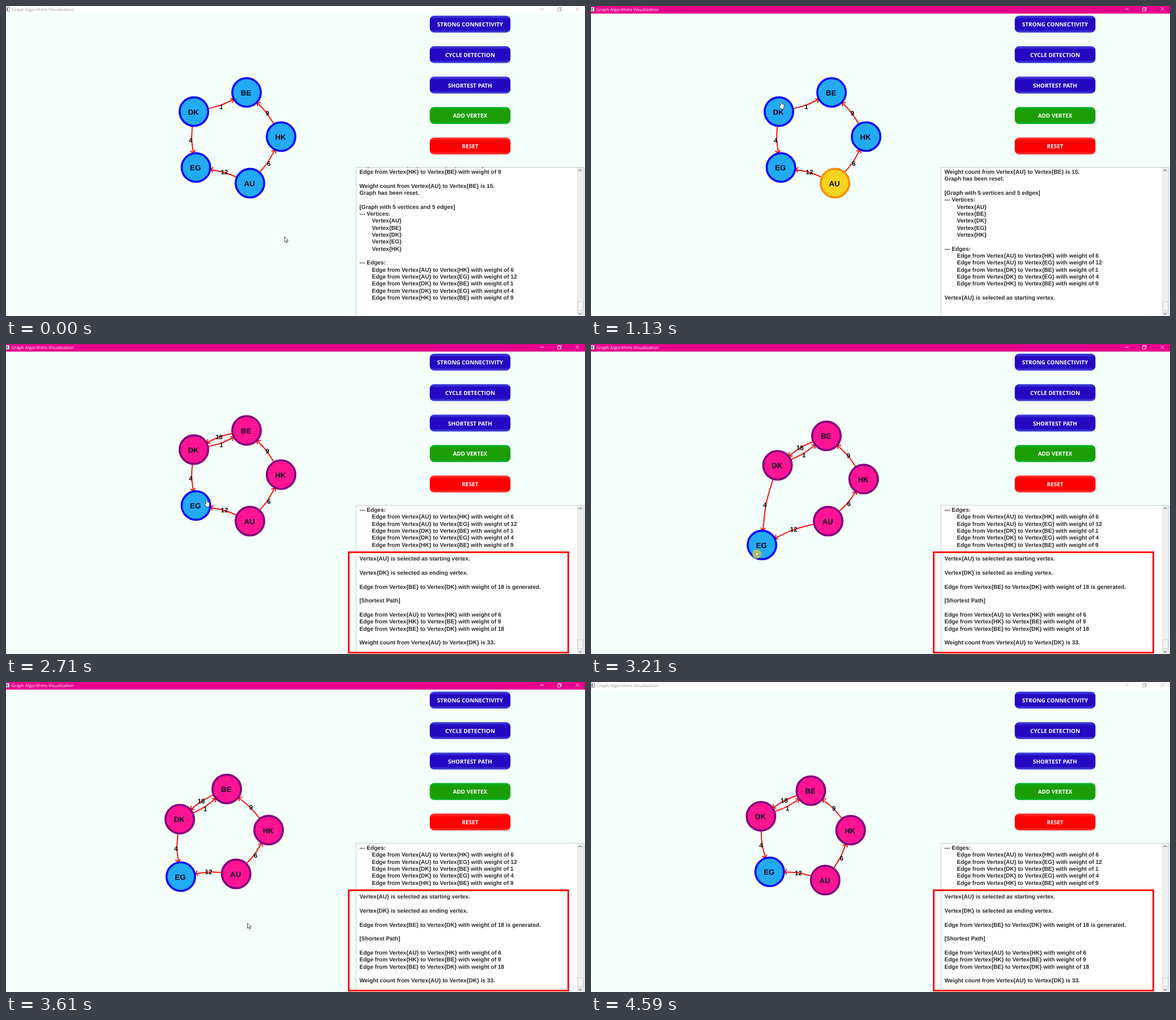
Write an HTML page that moves like this. It is 1023 px wide and 547 px high and loops after 4610 ms.

```html
<!DOCTYPE html>
<html lang="en">
<head>
<meta charset="utf-8">
<title>Graph Algorithms Visualization</title>
<style>
  html, body { margin: 0; width: 100%; height: 100%; overflow: hidden; background: #f4fffb; }
  svg { display: block; width: 1023px; height: 547px; }
  text { white-space: pre; text-rendering: geometricPrecision; }
  .ui { font-family: "Open Sans", "Noto Sans", sans-serif; }
  .button { font-weight: 700; font-size: 9.95px; fill: #fff; text-anchor: middle; }
  .log { font: 700 10.06px "Liberation Sans", Arial, sans-serif; fill: #282828; }
  .node { font: 700 13.3px "Liberation Sans", Arial, sans-serif; fill: #06061a; text-anchor: middle; }
  .weight { font: 700 11.4px "Liberation Sans", Arial, sans-serif; fill: #000; text-anchor: middle; }
  .edge { fill: none; stroke: #fa140c; stroke-width: 2; }
  .pointer { fill: #fff; stroke: #222; stroke-width: .8; }
</style>
</head>
<body>
<svg id="stage" viewBox="0 0 1023 547">
  <defs>
    <clipPath id="logClip"><rect x="619" y="285.3" width="390" height="262"/></clipPath>
  </defs>
  <rect width="1023" height="547" fill="#f4fffb"/>
</svg>
<script>
const LOOP = 4610;
const PICK_START = 560, PICK_END = 1290, SOLVE = 2360;
const GRAB = 2960, RELEASE = 3310, REBOUND = 3610, POINTER_GONE = 4050, BLUR = 4570;
const stage = document.getElementById('stage');

function add(parent, tag, attrs = {}, text) {
  const el = document.createElementNS('http://www.w3.org/2000/svg', tag);
  set(el, attrs);
  if (text !== undefined) el.textContent = text;
  parent.appendChild(el);
  return el;
}
function set(el, attrs) {
  for (const key in attrs) el.setAttribute(key, attrs[key]);
}
const show = (el, visible) => set(el, { visibility: visible ? 'visible' : 'hidden' });

const ramp = (t, from, to) => Math.min(1, Math.max(0, (t - from) / (to - from)));
const smooth = u => u * u * (3 - 2 * u);
const easeOut = u => 1 - (1 - u) ** 3;
const mix = ([x0, y0], [x1, y1], u) => [x0 + (x1 - x0) * u, y0 + (y1 - y0) * u];

// Title bar
const titleBar = add(stage, 'rect', { width: 1023, height: 13.4 });
add(stage, 'rect', { x: -.5, y: 2, width: 6.5, height: 7.5, fill: '#fff', stroke: '#667', 'stroke-width': .8 });
add(stage, 'rect', { x: 1, y: 3.5, width: 2, height: 4.5, fill: '#556' });
const titleText = add(stage, 'text', { x: 9.8, y: 8.6, class: 'ui', 'font-size': 7.7 }, 'Graph Algorithms Visualization');
const controls = add(stage, 'path', {
  d: 'M943.5 5.5h6.5M974.5 4h5v5h-5zM976 4v-1.5h5v5h-1.5M1006.5 2.5l6 6m0-6l-6 6',
  fill: 'none', 'stroke-width': .8
});

// Buttons
const BUTTONS = [
  ['STRONG CONNECTIVITY', 'blue'], ['CYCLE DETECTION', 'blue'], ['SHORTEST PATH', 'blue'],
  ['ADD VERTEX', 'green'], ['RESET', 'red']
];
const SHADES = { blue: ['#4a4fe0', '#2408c2'], green: ['#06b42c', '#1b9e05'], red: ['#ff4840', '#ff0000'] };
const buttonTop = i => 17 + i * 53.75;
for (const name in SHADES) {
  const gradient = add(stage.querySelector('defs'), 'linearGradient', { id: name, x2: 0, y2: 1 });
  const [edge, core] = SHADES[name];
  [[0, edge], [.2, core], [.82, core], [1, edge]].forEach(([offset, color]) =>
    add(gradient, 'stop', { offset, 'stop-color': color }));
}
BUTTONS.forEach(([label, shade], i) => {
  const y = buttonTop(i);
  add(stage, 'rect', { x: 748.7, y, width: 142.6, height: 30, rx: 8, fill: `url(#${shade})` });
  add(stage, 'text', { x: 820, y: y + 19, class: 'ui button' }, label);
});

// Graph: each vertex has its place at home, on release, after the rebound and settled
const VERTICES = {
  AU: [[431, 312.6], [414.3, 312.6], [406.6, 338.5], [413.8, 349.6]],
  BE: [[425, 152.5], [412.4, 165.8], [390, 188.7], [388.4, 191.7]],
  DK: [[332, 186.3], [328.6, 225], [307, 242], [300.3, 237]],
  EG: [[335.6, 285], [288.8, 382], [308.8, 343.5], [315.7, 335]],
  HK: [[486, 230.5], [480, 241.4], [464, 261.3], [458.7, 261.5]]
};
const edge = (from, to, weight) => ({ from, to, weight });
const EDGES = [edge('AU', 'HK', 6), edge('AU', 'EG', 12), edge('DK', 'BE', 1), edge('DK', 'EG', 4), edge('HK', 'BE', 9)];
const GENERATED = edge('BE', 'DK', 18);
const ALL_EDGES = [...EDGES, GENERATED];
const SHORTEST = [EDGES[0], EDGES[4], GENERATED];

// Log panel
add(stage, 'rect', { x: 618.5, y: 284.8, width: 403, height: 270, fill: '#fff', stroke: '#c4c9c9' });
add(stage, 'rect', { x: 1009.5, y: 285.5, width: 11.5, height: 262, fill: '#eee', stroke: '#dedede', 'stroke-width': .7 });
add(stage, 'rect', { x: 1010.3, y: 522, width: 9.2, height: 15.5, fill: '#f4f4f4', stroke: '#c4c4c4', 'stroke-width': .8 });
add(stage, 'path', { d: 'M1011.5 291.5l3-3 3 3M1011.5 541.5l3 3 3-3', fill: 'none', stroke: '#6f7f95', 'stroke-width': 1.1 });

const describe = ({ from, to, weight }) => `Edge from Vertex{${from}} to Vertex{${to}} with weight of ${weight}`;
const indent = line => '\t' + line;
const LINES = [
  describe(EDGES[0]), describe(EDGES[4]), '',
  'Weight count from Vertex{AU} to Vertex{BE} is 15.', 'Graph has been reset.', '',
  '[Graph with 5 vertices and 5 edges]', '--- Vertices:',
  ...Object.keys(VERTICES).map(name => indent(`Vertex{${name}}`)), '',
  '--- Edges:', ...EDGES.map(describe).map(indent), '',
  'Vertex{AU} is selected as starting vertex.', '',
  'Vertex{DK} is selected as ending vertex.', '',
  describe(GENERATED) + ' is generated.', '',
  '[Shortest Path]', '', ...SHORTEST.map(describe), '',
  'Weight count from Vertex{AU} to Vertex{DK} is 33.'
];
const LINE_HEIGHT = 12.34;
const logText = add(add(stage, 'g', { 'clip-path': 'url(#logClip)' }), 'g');
const logLines = LINES.map((line, i) => add(logText, 'text', {
  class: 'log', x: line[0] === '\t' ? 646.5 : 624.5, y: 296 + (i - 1) * LINE_HEIGHT
}, line.trim()));
const highlight = add(stage, 'rect', { x: 605.5, y: 367.5, width: 388, height: 177, fill: 'none', stroke: '#fb0007', 'stroke-width': 3 });

function drawLog(t) {
  const solved = t >= SOLVE;
  const scroll = solved ? 13 : 2 * ((t >= PICK_START) + (t >= PICK_END));
  set(logText, { transform: `translate(0 ${-scroll * LINE_HEIGHT})` });
  logLines.forEach((line, i) => show(line, solved || i < scroll + 20));
  show(highlight, solved);
}

const STYLES = { idle: ['#23aaf5', '#0a0af5'], picked: ['#f9d41e', '#ff8c08'], path: ['#ff1493', '#800080'] };
for (const e of ALL_EDGES) e.line = add(stage, 'path', { class: 'edge' });
const nodes = Object.keys(VERTICES).map(name => ({
  name,
  circle: add(stage, 'circle', { r: 25.2, 'stroke-width': 3.6 }),
  label: add(stage, 'text', { class: 'node' }, name)
}));
for (const e of ALL_EDGES) e.label = add(stage, 'text', { class: 'weight' }, e.weight);

// Pulled steadily with the dragged vertex, then springing back and settling
function placeOf(name, t) {
  const [home, pulled, rebound, settled] = VERTICES[name];
  if (t < RELEASE) return mix(home, pulled, ramp(t, GRAB, RELEASE));
  if (t < REBOUND) return mix(pulled, rebound, easeOut(ramp(t, RELEASE, REBOUND)));
  return mix(rebound, settled, easeOut(ramp(t, REBOUND, LOOP)));
}

function styleOf(name, t) {
  if (t >= SOLVE) return name === 'EG' ? 'idle' : 'path';
  const picked = (name === 'AU' && t >= PICK_START) || (name === 'DK' && t >= PICK_END);
  return picked ? 'picked' : 'idle';
}

// The control point is the midpoint swung about the start; longer edges bend less.
function drawEdge(e, [x0, y0], [x1, y1]) {
  const length = Math.hypot(x1 - x0, y1 - y0);
  const bend = (12.1 - .034 * length) * Math.PI / 180;
  const heading = Math.atan2(y1 - y0, x1 - x0) + bend;
  const cx = x0 + length / 2 * Math.cos(heading);
  const cy = y0 + length / 2 * Math.sin(heading);
  const aim = Math.atan2(y1 - cy, x1 - cx);
  const tipX = x1 - 26 * Math.cos(aim), tipY = y1 - 26 * Math.sin(aim);
  const arm = side => `${tipX - 6.3 * Math.cos(aim + side)} ${tipY - 6.3 * Math.sin(aim + side)}`;
  const spread = Math.PI / 4;
  set(e.line, { d: `M${x0} ${y0}C${cx} ${cy} ${cx} ${cy} ${x1} ${y1}M${arm(spread)}L${tipX} ${tipY}L${arm(-spread)}` });
  set(e.label, { x: cx, y: cy + 5.6 });
}

// Pointer
const pointer = add(stage, 'g');
const shapes = {
  arrow: add(pointer, 'path', { class: 'pointer', d: 'M0 0v9.5l2.2-2 1.5 3.3 1.6-.7-1.5-3.2h3z' }),
  hand: add(pointer, 'path', { class: 'pointer', d: 'M-1.2 8V1q1.1-2 2.2 0v3.6l4.3 1.2-.6 5.5-.8 2.2h-4.4l-3.2-5 1-1.3z' }),
  drag: add(pointer, 'g')
};
add(shapes.drag, 'circle', { r: 8, fill: '#b9c956', 'fill-opacity': .9 });
for (let angle = 0; angle < 360; angle += 90) {
  add(shapes.drag, 'path', { d: 'M0-6l2 2.4h-4z', transform: `rotate(${angle})`, fill: '#fff', stroke: '#5c6a30', 'stroke-width': .5 });
}
add(shapes.drag, 'rect', { x: -1.2, y: -1.2, width: 2.4, height: 2.4, fill: '#fff' });

function pointerPlace(t, [egX, egY]) {
  const moves = [
    [140, 340, [431, 297]],
    [PICK_START, 1120, [336, 168]],
    [PICK_END, 1900, [806, 143.5]],
    [SOLVE, 2700, [354.5, 274]],
    [GRAB, GRAB + 90, [egX - 9, egY + 16]],
    [RELEASE, REBOUND, [426, 425]]
  ];
  const rest = moves.reduce((at, [from, to, target]) => mix(at, target, smooth(ramp(t, from, to))), [492, 407]);
  const u = ramp(t, REBOUND, 4030);
  const [x, y] = mix(rest, [516, 505], u);
  return [x + 50 * Math.sin(Math.PI * u), y];
}

function pointerShape(x, y, t, places) {
  if (t >= GRAB && t < RELEASE) return 'drag';
  const onNode = Object.values(places).some(([nx, ny]) => Math.hypot(x - nx, y - ny) < 27);
  const onButton = x > 749 && x < 891 && BUTTONS.some((_, i) => y > buttonTop(i) && y < buttonTop(i) + 30);
  return onNode || onButton ? 'hand' : 'arrow';
}

function render(t) {
  const active = t >= PICK_START && t < BLUR;
  const ink = active ? '#fff' : '#999';
  set(titleBar, { fill: active ? '#e6008c' : '#fff' });
  set(titleText, { fill: ink });
  set(controls, { stroke: ink });
  drawLog(t);

  const places = {};
  for (const { name, circle, label } of nodes) {
    const [x, y] = places[name] = placeOf(name, t);
    const [fill, stroke] = STYLES[styleOf(name, t)];
    set(circle, { cx: x, cy: y, fill, stroke });
    set(label, { x: x - .9, y: y + 5.2 });
  }
  for (const e of ALL_EDGES) {
    const visible = e !== GENERATED || t >= SOLVE;
    drawEdge(e, places[e.from], places[e.to]);
    show(e.line, visible);
    show(e.label, visible);
  }

  const [x, y] = pointerPlace(t, places.EG);
  const current = pointerShape(x, y, t, places);
  set(pointer, { transform: `translate(${x} ${y})` });
  for (const name in shapes) show(shapes[name], name === current && t < POINTER_GONE);
}

const start = performance.now();
function tick() {
  render((performance.now() - start) % LOOP);
  requestAnimationFrame(tick);
}
render(0);
requestAnimationFrame(tick);
</script>
</body>
</html>
```
